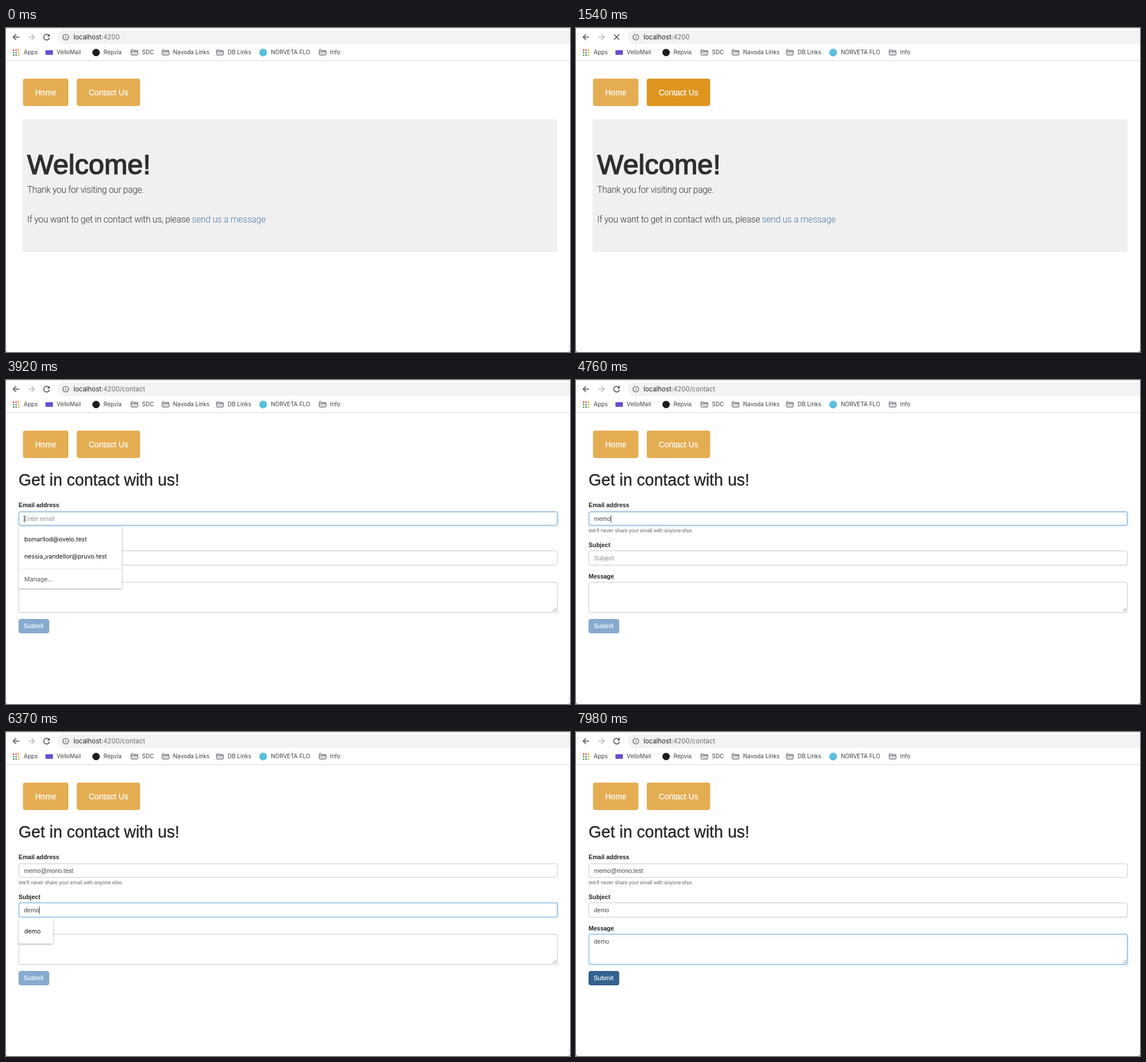
Recreate the animation shown at these times as an HTML page. Size 986 by 568 pixels, loop 8 s.

```html
<!DOCTYPE html>
<html lang="en">
<head>
<meta charset="utf-8">
<title>Contact form</title>
<style>
  html, body { margin: 0; width: 100%; height: 100%; overflow: hidden; background: #fff; }
  svg { display: block; width: 986px; height: 568px; }
  text { font-family: "Liberation Sans", Arial, sans-serif; white-space: pre; }
  .ui { font-family: Inter, Roboto, sans-serif; }
  .marks { font-size: 10px; fill: #3c4043; }
  .url { font-size: 11.4px; fill: #202124; }
  .url tspan { fill: #6a6d71; }
  .nav text { font-size: 14px; fill: #fff; stroke: #fff; stroke-width: .25px; }
  .nav rect { fill: #e5ad52; stroke: #dfa64b; }
  .nav .hover rect { fill: #de961f; stroke: #cf8b1c; }
  .thin { font: 300 15.6px Roboto, "Open Sans", sans-serif; letter-spacing: -.3px; fill: #333; }
  .invite { letter-spacing: -.2px; }
  .label { font-size: 10.5px; font-weight: bold; fill: #222; }
  .value { font-size: 10.5px; fill: #444; }
  .value.empty { fill: #8c8c8c; }
  .box { fill: #fff; stroke: #c8c8c8; }
  .glow { fill: none; stroke: #72aedb; filter: drop-shadow(0 0 2.5px rgba(102, 175, 233, .65)); }
  .menu rect { fill: #fff; filter: drop-shadow(0 1px 1.5px rgba(0, 0, 0, .38)); }
  .menu text { font-size: 10.7px; fill: #111; }
  .submit rect { fill: #87abcf; stroke: #7b9fc4; }
  .submit.on rect { fill: #3f79b2; stroke: #356ba0; }
  .submit.hover rect { fill: #33628f; stroke: #264f77; }
  .submit text { font-size: 11px; fill: #fff; stroke: #fff; stroke-width: .2px; }
</style>
</head>
<body>
<svg viewBox="0 0 986 568">
  <defs>
    <g id="folder" stroke="#5f6368" fill="#d9dbdd">
      <path d="M.5 1.5q0-1 1-1h3l1.3 1.5h5.7q1 0 1 1v6q0 1-1 1h-10q-1 0-1-1zM.5 3.8h12"/>
    </g>
  </defs>

  <rect width="986" height="568" fill="#fff"/>
  <rect width="986" height="1" fill="#d6d8db"/>
  <path d="M0 565v3h3q-3 0-3-3M986 565v3h-3q3 0 3-3" fill="#444"/>

  <!-- toolbar -->
  <rect x="90" y="4" width="920" height="24" rx="12" fill="#f1f3f4"/>
  <g fill="none" stroke-width="1.5">
    <path d="M23 16H13M17.5 11l-5 5 5 5" stroke="#4a4d51"/>
    <path d="M39 16h10M44.5 11l5 5-5 5" stroke="#babcbe"/>
    <g id="reload" stroke="#4a4d51">
      <path d="M75.2 13.2A5 5 0 1 0 76 17"/>
      <path d="M76.5 10.3v4.7h-4.7z" fill="#4a4d51" stroke="none"/>
    </g>
    <path id="stop" d="M66.5 11.5l9 9M75.5 11.5l-9 9" stroke="#4a4d51"/>
    <circle cx="104.5" cy="16" r="5" stroke="#5f6368" stroke-width="1.2"/>
    <path d="M104.5 15.3v3.5M104.5 13v1.3" stroke="#5f6368" stroke-width="1.2"/>
  </g>
  <text class="ui url" x="118" y="20">localhost<tspan id="path"></tspan></text>
  <g id="dots"></g>
  <rect x="69" y="39" width="13" height="8" fill="#6b4fd0"/>
  <circle cx="157.500" cy="43" r="6.5" fill="#1b1f23"/>
  <circle cx="449.5" cy="43" r="6.8" fill="#5bbfe0"/>
  <use href="#folder" x="218" y="37.5"/>
  <use href="#folder" x="272.5" y="37.5"/>
  <use href="#folder" x="367.5" y="37.5"/>
  <use href="#folder" x="547" y="37.5"/>
  <g class="marks">
    <text class="ui" x="31" y="46">Apps</text>
    <text class="ui" x="88.5" y="46">VelloMail</text>
    <text class="ui" x="170.5" y="46">Repvia</text>
    <text class="ui" x="237.5" y="46">SDC</text>
    <text class="ui" x="292" y="46">Navoda Links</text>
    <text class="ui" x="387.5" y="46">DB Links</text>
    <text class="ui" x="463" y="46">NORVETA FLO</text>
    <text class="ui" x="566.5" y="46">Info</text>
  </g>
  <path d="M0 57.5h986" stroke="#d9dadb"/>

  <g class="nav">
    <g><rect x="30.2" y="89.2" width="78.300" height="47" rx="3"/><text x="51" y="118">Home</text></g>
    <g id="contact"><rect x="124.2" y="89.2" width="109.800" height="47" rx="3"/><text x="144.5" y="118">Contact Us</text></g>
  </g>

  <g id="welcome">
    <rect x="29" y="160" width="935" height="233" fill="#f0f0f0"/>
    <text x="37" y="255.5" font-size="48.8" fill="#2f2f2f" stroke="#2f2f2f" stroke-width="1.5">Welcome!</text>
    <text class="thin" x="37" y="288.5">Thank you for visiting our page.</text>
    <text class="thin invite" x="37" y="340.5">If you want to get in contact with us, please </text>
    <text class="thin invite" x="325" y="340.5" style="fill:#4f7ba8">send us a message</text>
  </g>

  <g id="form">
    <text x="22" y="185" font-size="28.6" fill="#262626" stroke="#262626" stroke-width=".35">Get in contact with us!</text>
    <text class="label" x="22" y="223">Email address</text>
    <text x="22" y="266.5" font-size="8.9" fill="#666">We'll never share your email with anyone else.</text>
    <text class="label" x="22" y="292.5">Subject</text>
    <text class="label" x="22" y="347.5">Message</text>
    <g id="fields"></g>
    <path d="M956 405.5l6-6M959.5 405.5l2.5-2.5" stroke="#777"/>
    <g id="submit" class="submit">
      <rect x="22.5" y="419.5" width="52.5" height="24" rx="3"/>
      <text x="31" y="435">Submit</text>
    </g>
    <g id="emails" class="menu">
      <rect x="22" y="257" width="180.5" height="108.5" rx="2.5"/>
      <path d="M22 331.5h180.5" stroke="#e4e4e4"/>
      <text class="ui" x="32" y="283">bsmarllod@ovelo.test</text>
      <text class="ui" x="32" y="313">nessia_vandellor@pruvo.test</text>
      <text class="ui" x="32" y="352.5" style="fill:#555">Manage...</text>
    </g>
    <g id="subjects" class="menu">
      <rect x="22" y="327" width="60.5" height="44" rx="2.5"/>
      <text class="ui" x="32" y="352.5">demo</text>
    </g>
  </g>
</svg>

<script>
const LOOP = 8000, STEP = 70, FADE = 150;
const $ = id => document.getElementById(id);

function add(parent, tag, attrs) {
  const el = document.createElementNS("http://www.w3.org/2000/svg", tag);
  for (const key in attrs) el.setAttribute(key, attrs[key]);
  return parent.appendChild(el);
}

["#d9534a", "#d9534a", "#e0a83a", "#4f9a58", "#4b7fd8", "#e0a83a", "#4f9a58", "#4f9a58", "#e0a83a"]
  .forEach((fill, i) => add($("dots"), "rect", {
    x: 12 + i % 3 * 4.3, y: 37.5 + Math.floor(i / 3) * 4.3, width: 2.6, height: 2.6, fill
  }));

// keys: when each character arrives; caret: [on, off] spans; focus: glow span
const fields = [
  { y: 231, h: 24, base: 247, hint: "Enter email", text: "memo@mono.test",
    keys: [4480, 4550, 4620, 4760, 4830, 4900, 4970, 4970, 5040, 5180, 5390, 5460, 5530, 5600],
    caret: [[3640, 4200], [4480, 5740]], focus: [3570, 5810] },
  { y: 299.5, h: 25, base: 316, hint: "Subject", text: "demo",
    keys: [6020, 6090, 6230, 6300], caret: [[5740, 6580]], focus: [5810, 6580] },
  { y: 354.5, h: 53, base: 370.5, hint: "", text: "demo",
    keys: [6860, 6930, 7070, 7210], caret: [[6580, 7700]], focus: [6580, LOOP + FADE] }
];

for (const f of fields) {
  const box = { x: 22.5, y: f.y, width: 941.5, height: f.h, rx: 3 };
  add($("fields"), "rect", { ...box, class: "box" });
  f.label = add($("fields"), "text", { x: 31.5, y: f.base });
  f.cursor = add($("fields"), "rect", { y: f.base - 10, width: 1, height: 13, fill: "#333" });
  f.glow = add($("fields"), "rect", { ...box, class: "glow" });
}

const show = (el, on) => el.style.display = on ? "" : "none";
const within = (t, [from, to]) => t >= from && t < to;
const ease = (t, start) => {
  const p = Math.min(1, Math.max(0, (t - start) / FADE));
  return p * p * (3 - 2 * p);
};

function drawField(f, t) {
  const typed = f.text.slice(0, f.keys.filter(k => k <= t).length);
  f.label.textContent = typed || f.hint;
  f.label.setAttribute("class", typed ? "value" : "value empty");
  const lit = f.caret.some(span => within(t, span));
  show(f.cursor, lit);
  if (lit) f.cursor.setAttribute("x", 31.5 + (typed ? f.label.getComputedTextLength() : 0));
  f.glow.style.opacity = ease(t, f.focus[0]) - ease(t, f.focus[1]);
}

function draw() {
  const t = Math.floor(performance.now() % LOOP / STEP) * STEP;
  const onForm = t >= 2730, loading = within(t, [1470, 2800]);
  show($("stop"), loading);
  show($("reload"), !loading);
  show($("welcome"), !onForm);
  show($("form"), onForm);
  $("path").textContent = onForm ? ":4200/contact" : ":4200";
  $("contact").setAttribute("class", within(t, [980, 3220]) ? "hover" : "");
  if (onForm) {
    fields.forEach(f => drawField(f, t));
    show($("emails"), within(t, [3780, 4480]));
    show($("subjects"), within(t, [6090, 6580]));
    $("submit").setAttribute("class", "submit" + (t >= 7910 ? " hover" : t >= 6860 ? " on" : ""));
  }
  requestAnimationFrame(draw);
}
draw();
</script>
</body>
</html>
```
